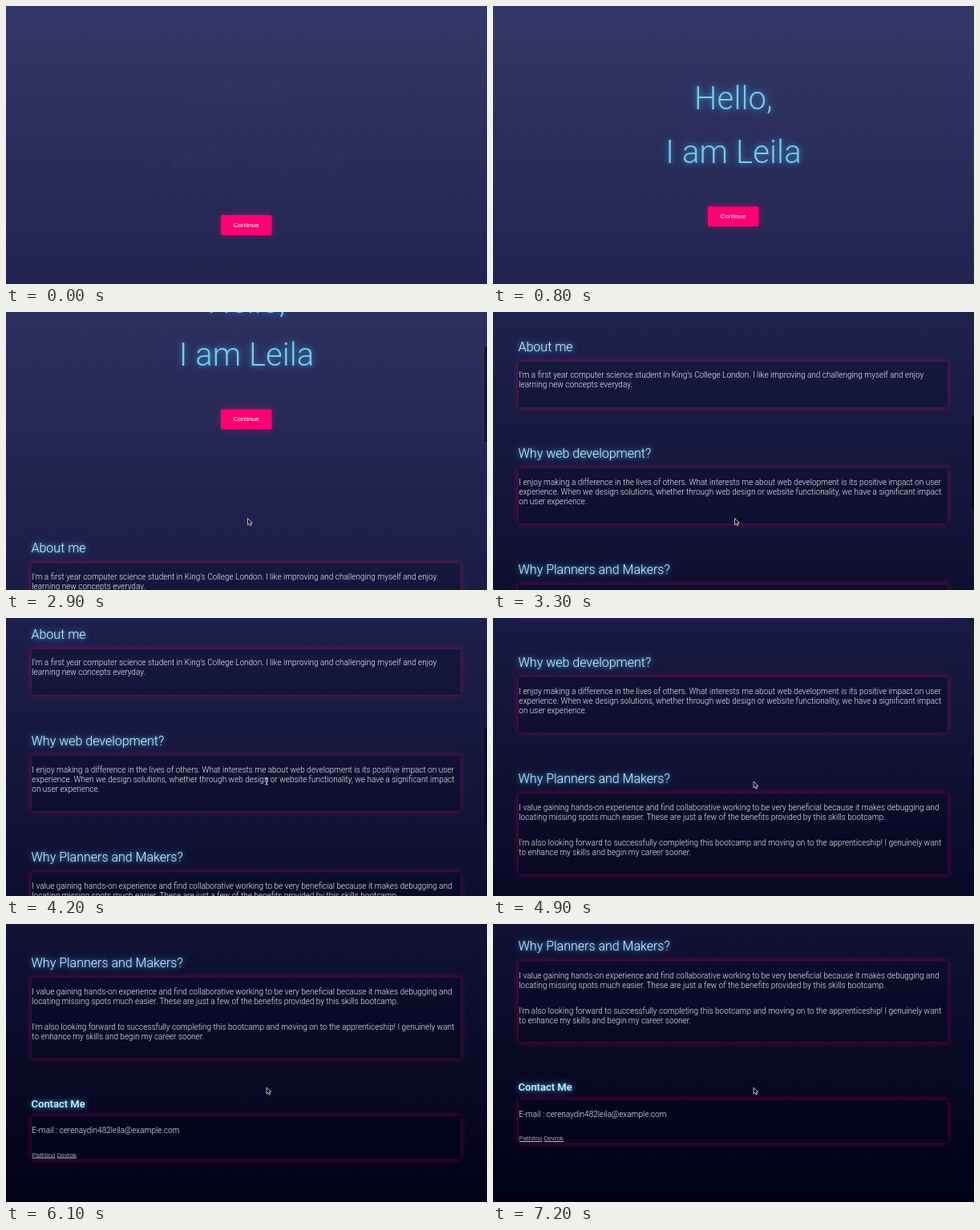
Animation, 600 px wide and 347 px high, one loop 7300 ms. Source, as an HTML page:

```html
<!DOCTYPE html>
<html lang="en">
<head>
<meta charset="utf-8">
<title>Portfolio page</title>
<style>
  html, body { margin: 0; width: 100%; height: 100%; overflow: hidden; background: #20224c; }
  svg { display: block; width: 100vw; height: 100vh; font-family: Roboto, sans-serif; font-weight: 300; }
  .title { fill: #7accE6; text-anchor: middle; }
  .head { fill: #d9f4ff; font-size: 16px;
    filter: drop-shadow(0 0 2px rgba(70, 190, 245, .6)) drop-shadow(0 0 5px rgba(50, 160, 230, .65)); }
  .small { font-size: 13px; font-weight: 500; }
  .body { fill: #eeeef6; font-size: 10px; }
  .link { fill: #eeeef6; font-size: 8px; text-decoration: underline; }
  .glow { fill: #ff0072; filter: blur(4px); }
  .label { fill: #fff; font: 8px "Liberation Sans", Arial, sans-serif; text-anchor: middle; }
</style>
</head>
<body>
<svg viewBox="0 0 600 347" preserveAspectRatio="none">
  <defs>
    <linearGradient id="sky" gradientUnits="userSpaceOnUse" x1="0" y1="0" x2="0" y2="1021">
      <stop offset="0" stop-color="#343868"/>
      <stop offset=".42" stop-color="#1d1e49"/>
      <stop offset="1" stop-color="#000016"/>
    </linearGradient>
  </defs>
  <g id="page">
    <rect width="600" height="1021" fill="url(#sky)"/>
    <g id="hero">
      <text class="title" x="300">Hello,</text>
      <text class="title" x="300">I am Leila</text>
    </g>
    <g id="button">
      <rect class="glow" x="268" y="250" width="63.5" height="25" opacity=".5"/>
      <rect x="268" y="250" width="63.5" height="25" rx="2" fill="#ff0072"/>
      <text class="label" x="299.5" y="265">Continue</text>
    </g>
  </g>
  <rect id="thumb" x="597" width="3" height="118" fill="#05051a"/>
  <g id="cursor">
    <path id="arrow" d="M0 0V8.2L1.9 6.5L3.2 9.2L4.5 8.6L3.3 6L5.8 5.8Z" fill="#111" stroke="#fff" stroke-width=".7"/>
    <path id="hand" d="M-1 -3.5Q0 -4.3 .4 -3.3L.9 -.8L3 -.3Q3.9 0 3.7 1.2L3 3.8H-.8L-3 .8Q-2.8 -.2 -1.6 .5L-.6 1Z" fill="#fff" stroke="#222" stroke-width=".6"/>
    <path id="beam" d="M-1.8 -4Q0 -4 0 -3Q0 -4 1.8 -4M0 -3V3M-1.8 4Q0 4 0 3Q0 4 1.8 4M-1 1.2H1" fill="none" stroke="#fff" stroke-width=".8"/>
  </g>
</svg>
<script>
const LOOP = 7300, PAGE = 1021, VIEW = 347;
const $ = id => document.getElementById(id);
const page = $('page'), titles = [...document.querySelectorAll('.title')];

function add(tag, attrs, text = '') {
  const el = document.createElementNS('http://www.w3.org/2000/svg', tag);
  for (const key in attrs) el.setAttribute(key, attrs[key]);
  el.textContent = text;
  page.append(el);
}

function section(title, base, top, height, lines, small = '') {
  const box = { x: 32, y: top, width: 535, height };
  add('text', { class: 'head ' + small, x: 31.5, y: base }, title);
  add('rect', { ...box, class: 'glow', opacity: .42 });
  add('rect', { ...box, fill: 'url(#sky)' });
  add('rect', { ...box, fill: '#000018', opacity: .22 });
  for (const [y, text] of lines) add('text', { class: 'body', x: 32.3, y }, text);
}

section('About me', 429, 442, 57, [
  [462.5, "I'm a first year computer science student in King's College London. I like improving and challenging myself and enjoy"],
  [474.5, 'learning new concepts everyday.']
]);
section('Why web development?', 562, 575, 69, [
  [596, 'I enjoy making a difference in the lives of others. What interests me about web development is its positive impact on user'],
  [608, 'experience. When we design solutions, whether through web design or website functionality, we have a significant impact'],
  [620, 'on user experience.']
]);
section('Why Planners and Makers?', 707, 720.5, 100.5, [
  [741.5, 'I value gaining hands-on experience and find collaborative working to be very beneficial because it makes debugging and'],
  [753.5, 'locating missing spots much easier. These are just a few of the benefits provided by this skills bootcamp.'],
  [785.5, "I'm also looking forward to successfully completing this bootcamp and moving on to the apprenticeship! I genuinely want"],
  [797.5, 'to enhance my skills and begin my career sooner.']
]);
section('Contact Me', 882, 893.5, 53.5, [
  [914.5, 'E-mail : cerenaydin482leila@example.com']
], 'small');
add('text', { class: 'link', x: 32.8, y: 944 }, 'Pathlino');
add('text', { class: 'link', x: 63.8, y: 944 }, 'Devrok');

const clamp = v => Math.max(0, Math.min(1, v));
const smooth = v => { v = clamp(v); return v * v * (3 - 2 * v); };
const mix = (a, b, k) => a + (b - a) * k;

// Monotone cubic curve through [time, value] points
function curve(pts) {
  const slope = i => (pts[i + 1][1] - pts[i][1]) / (pts[i + 1][0] - pts[i][0]);
  const tangent = pts.map((p, i) => {
    if (!i || i === pts.length - 1) return 0;
    const a = slope(i - 1), b = slope(i);
    return a * b > 0 ? 2 * a * b / (a + b) : 0;
  });
  return t => {
    if (t <= pts[0][0]) return pts[0][1];
    const i = pts.findIndex(p => p[0] > t) - 1;
    if (i < 0) return pts[pts.length - 1][1];
    const h = pts[i + 1][0] - pts[i][0], u = (t - pts[i][0]) / h, w = 1 - u;
    return pts[i][1] * w * w * (1 + 2 * u) + pts[i + 1][1] * u * u * (3 - 2 * u)
      + h * u * w * (w * tangent[i] - u * tangent[i + 1]);
  };
}

const scrollAt = curve([[2450, 0], [2600, 10], [2900, 128], [3100, 310], [3200, 372], [3300, 380],
  [4000, 384], [4200, 403], [4900, 501], [5500, 590], [6000, 645], [6400, 671], [6700, 674], [7300, 674]]);

function drawHero(t) {
  const k = t < 1600 ? Math.exp(-t / 190) : 0;
  const alpha = mix(.035, 1, smooth(t / 850));
  const blur = k > .01 ? `blur(${(4 * k).toFixed(2)}px) ` : '';
  titles.forEach((el, i) => {
    el.setAttribute('y', i ? mix(196, 203, k) : mix(129.5, 122, k));
    el.style.fontSize = mix(40, 48.5, k) + 'px';
    el.style.letterSpacing = 5 * k + 'px';
  });
  $('hero').style.filter = blur + 'drop-shadow(0 0 3px rgba(60,180,235,.5)) drop-shadow(0 0 6px rgba(50,150,220,.5))';
  $('hero').style.opacity = alpha;
  $('button').setAttribute('transform', `translate(0 ${11 * k})`);
}

function drawCursor(t) {
  const move = smooth((t - 3300) / 600), leave = smooth((t - 2200) / 400);
  const x = mix(mix(305, 301.5, leave), 325, move);
  const y = mix(mix(255, 257.5, leave), 204, move);
  const kind = t < 2550 ? 'hand' : t > 3800 && t < 4400 ? 'beam' : 'arrow';
  for (const id of ['hand', 'beam', 'arrow']) $(id).style.display = id === kind ? '' : 'none';
  $('cursor').style.display = t < 1300 ? 'none' : '';
  $('cursor').setAttribute('transform', `translate(${x} ${y})`);
}

function draw(t) {
  const s = scrollAt(t);
  drawHero(t);
  drawCursor(t);
  page.setAttribute('transform', `translate(0 ${-s})`);
  $('thumb').setAttribute('y', s * VIEW / PAGE);
  $('thumb').setAttribute('opacity', .7 * clamp((t - 2450) / 150) * (1 - .6 * clamp((t - 6900) / 300)));
}

const start = performance.now();
function tick() {
  draw((performance.now() - start) % LOOP);
  requestAnimationFrame(tick);
}
draw(0);
requestAnimationFrame(tick);
</script>
</body>
</html>
```
